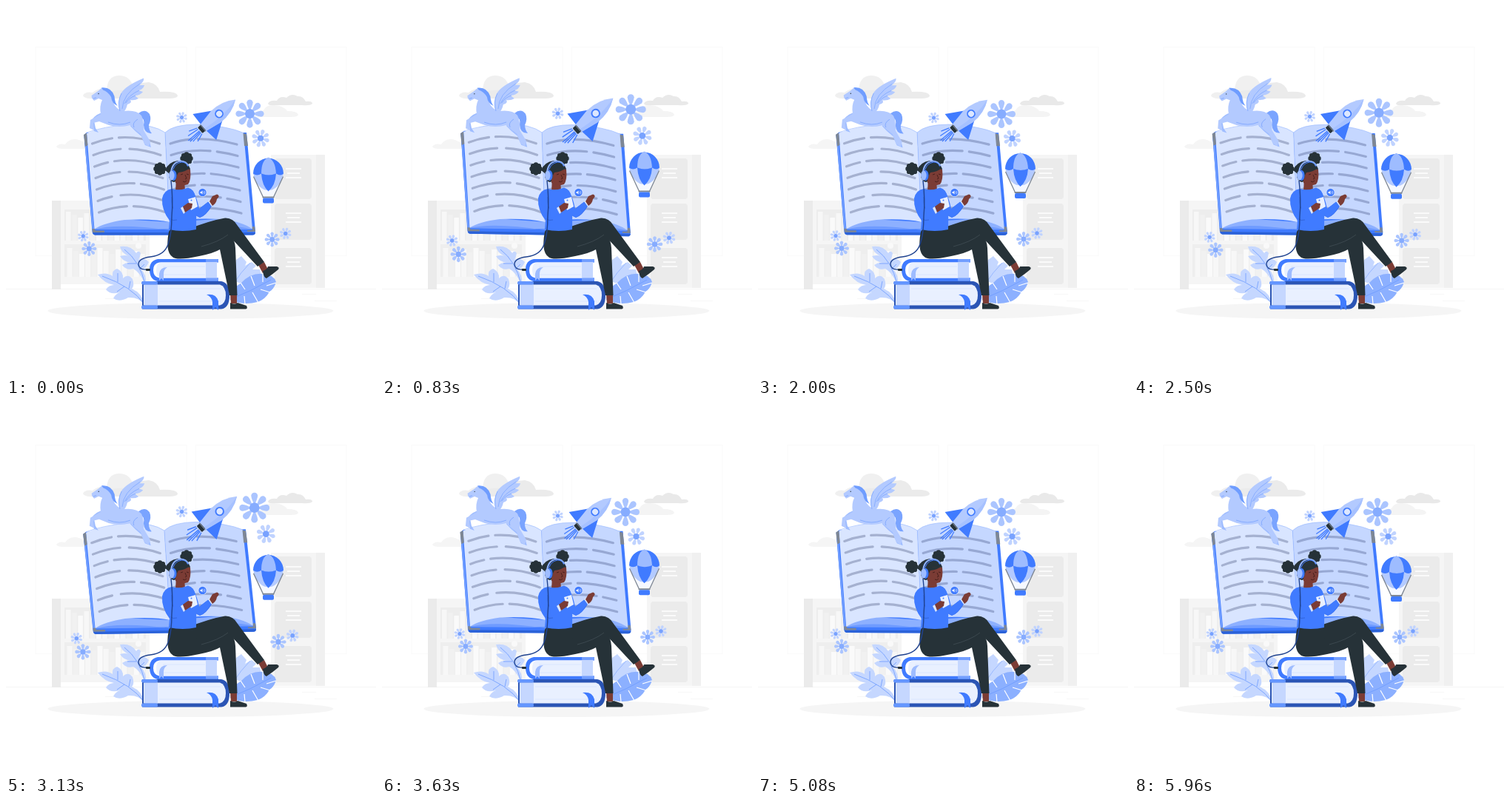
These frames come from a looping animation (500x500 px, 6000 ms). An HTML page with a canvas:

```html
<!DOCTYPE html>
<html lang="en">
<head>
<meta charset="utf-8">
<title>Audio book</title>
<style>
html,body{margin:0;width:100%;height:100%;overflow:hidden;background:#fff}
canvas{display:block;width:100vw;height:100vh}
</style>
</head>
<body>
<canvas id="c"></canvas>
<script>
const cv = document.getElementById('c'), g = cv.getContext('2d');
const LOOP = 6000, TAU = Math.PI * 2;
const BLUE = '#407bff', DARK = '#263238', SKIN = '#7b3c35', DEEP = '#2b55b5';

// drawing helpers
const paths = {};
const path = d => paths[d] || (paths[d] = new Path2D(d));
const fill = (c, d) => { g.fillStyle = c; g.fill(path(d)); };
const line = (c, w, d, dash = []) => {
  g.strokeStyle = c; g.lineWidth = w; g.setLineDash(dash);
  g.stroke(path(d)); g.setLineDash([]);
};
const rect = (c, x, y, w, h, r = 0) => {
  g.fillStyle = c; g.beginPath(); g.roundRect(x, y, w, h, r); g.fill();
};
const oval = (c, x, y, rx, ry = rx, a = 0) => {
  g.fillStyle = c; g.beginPath(); g.ellipse(x, y, rx, ry, a, 0, TAU); g.fill();
};
const pose = (x, y, {turn = 0, scale = 1}, draw) => {
  g.save(); g.translate(x, y); g.rotate(turn * Math.PI / 180);
  g.scale(scale, scale); g.translate(-x, -y); draw(); g.restore();
};

// motion rules: piecewise linear
const ramp = (p, keys) => {
  for (let i = 1; i < keys.length; i++) {
    const [a, u] = keys[i - 1], [b, v] = keys[i];
    if (p <= b) return u + (v - u) * (p - a) / (b - a);
  }
  return keys[keys.length - 1][1];
};
const BEAT = [[0, 0], [.1, 1], [.3, 0], [.4, 0], [.5, 1], [.6, 0], [1, 0]];
const WIND = [[0, 0], [.25, 1], [.75, -1], [1, 0]];
const cycle = t => t < 0 ? 0 : t / 1500 % 1;

function room() {
  g.strokeStyle = '#fafafa'; g.lineWidth = 1;
  g.strokeRect(40, 55.5, 204, 282); g.strokeRect(256.5, 55.5, 203.5, 282);
  line('#f2f2f2', .8, 'M0 382.5H500');
  line('#f5f5f5', .8, 'M417 398.5H447M400 389.5H419M134 395.5H152');
  oval('#f5f5f5', 249.5, 412, 193, 11);

  fill('#f0f0f0', 'M104 121Q107 115 117 117Q127 109 136 114Q137 94 153 94Q168 94 172 110L180 125H119Q106 126 104 121Z');
  fill('#ebebeb', 'M119 122Q128 120 134 118Q146 112 166 114Q177 103 193 103Q205 105 208 116Q230 115 232 121Q232 125 218 125H130Q120 125 119 122Z');
  fill('#f5f5f5', 'M68 190Q71 185 80 187Q85 179 95 180Q104 182 110 188V193H78Q69 193 68 190Z');
  fill('#e9e9e9', 'M354 132Q356 127 366 128Q370 121 379 124Q386 117 394 122Q401 121 405 129Q414 128 414 132Q411 135 400 134H364Q355 135 354 132Z');
  fill('#f4f4f4', 'M335 147Q342 144 348 141Q352 133 362 134Q374 134 380 142Q394 142 395 147Q395 150 384 150H340Z');

  // bookcase
  rect('#ebebeb', 62, 263, 12, 120);
  rect('#f5f5f5', 74, 263, 120, 113);
  rect('#ededed', 79, 275, 110, 42);
  rect('#eeeeee', 79, 322, 110, 44);
  for (let i = 0; i < 13; i++) {
    const x = 81 + i * 8.2, top = i * 7 % 5 * 2;
    const tone = ['#f7f7f7', '#f1f1f1', '#fafafa'][i % 3];
    rect(tone, x, 278 + top, 6.5, 39 - top);
    rect(tone, x + 1.5, 327 + top, 7, 39 - top);
  }
  oval('#f9f9f9', 179, 324, 4);

  // cabinet
  rect('#f5f5f5', 358, 201, 73, 180);
  rect('#f0f0f0', 419, 201, 12, 180);
  for (const y of [206, 267, 327]) {
    rect('#ebebeb', 363, y, 50, y < 210 ? 55 : 49, 4);
    const m = y + (y < 210 ? 20 : 19);
    line('#fafafa', 2.2, `M378 ${m - 6}H399M380 ${m}H397M378 ${m + 6}H399`);
  }
}

const L1 = [28, 38, 19, 34, 52, 20, 39], R1 = [29, 54, 22, 44, 30, 64, 36];
function book() {
  fill(BLUE, 'M105.5 174L109 171L325 171L337 304.5Q337 309.5 333 309.5H120Q117 309 116.5 305Z');
  fill('#2b62d8', 'M117 306H337Q337 309.5 333 309.5H120Q117.500 309 117 306Z');
  fill('#8db0ff', 'M119.500 301.500Q125 292 155 288L222 292L300 287Q326 292 333 301.500Z');
  fill('#6f9bff', 'M119 302Q150 293 222 303Q300 292 333 302Z');
  fill('#d9e5ff', 'M109 172Q132 163 165 160Q200 160 215 171L221 292Q200 287 160 289Q132 293 119.500 301.500Z');
  fill('#c5d7ff', 'M215 171Q226 160 258 160Q300 162 321 171.500L333 301.500Q319 291 290 288Q250 286 221 292Z');
  line('#9fbdff', .7, 'M109 171Q132 163 165 160Q200 160 215 171L221 292M215 171Q226 160 258 160Q300 162 321 171.500');
  line('#6f9dff', 2.5, 'M106.500 174L118 304');
  fill('#7e8794', 'M105 174L109 171.500L110.500 188L107 190ZM320.500 172L325 173L327 189L322 189ZM116.500 301L119.500 301L121 303.500H133V306H117ZM333 298L336 298L337 305H326V303H332.500Z');
  g.lineCap = 'round';
  for (let k = 0; k < 7; k++) {
    const x = 116.5 + k * 1.5, y = 186 + k * 15.5;
    line('#a5b1d0', 3.2, `M${x} ${y}Q${x + 43} ${y - 17} ${x + 91} ${y}`, [L1[k], 9 + k % 2 * 3, 140]);
    const u = 222 + k, v = 186 + k * 15.5;
    line('#97a8d3', 3.2, `M${u} ${v}Q${u + 38} ${v - 13} ${u + 90} ${v + 1}`, [R1[k], 9, 140]);
  }
  g.lineCap = 'butt';
}

function pegasus() {
  fill('#7aa4ff', 'M179 145Q188 138 194 146Q197 153 193 161Q193 168 197 172Q187 173 186 161Q188 150 180 151Z');
  // far legs
  fill('#9fbdff', 'M131 149Q121 150 119 155L121 165L125 171L119 169L116 154Q122 145 132 144Z');
  fill('#9fbdff', 'M172 156Q183 163 184 172L194 183L196 191L188 188L183 176Q174 169 168 162Z');
  // body
  fill('#b3caff', 'M116 124.500L115.500 121L125 114.500L130 110L132 113.500Q141 116 144.500 129Q148 140 159 142Q176 140 183 148Q187 156 186 168L195 183L193 190L187 186L182 173Q174 167 168 161Q153 165 139 161L126 156L118 158L119 168L113 165L114 154L128 146Q126 135 130 127L125 125L119 128Z');
  fill('#6f9dff', 'M129 110.500Q142 109 146.500 122Q147 131 151 135Q143 132 142 123Q138 116 131 113.500Z');
  line('#7aa4ff', .8, 'M138 157Q154 163 168 157M118 125L122 124M178 153Q170 158 173 164');
  oval(DARK, 125, 118.5, .7);
  // wing
  fill('#b3caff', 'M154 143Q149 130 156 117Q163 107 186 97.500Q187 102 180 107L187 107Q185 113 179 114L185 116Q181 121 174 121L179 125Q174 128 168 127Q171 131 164 133Q162 142 157 145Z');
  line('#7fa8ff', .8, 'M154 142Q150 130 156 118M157 139Q158 119 181 105M160 132Q166 120 180 114M162 131Q166 124 175 121');
}

function rocket() {
  g.save(); g.translate(282, 151); g.rotate(-.716);
  line(BLUE, 1.3, 'M-27 0H-47M-27 -3L-43 -5M-27 3L-43 5M-27 -5L-38 -9M-27 5L-38 9M-27 1.500L-46 2.500');
  fill(BLUE, 'M-19 -23L6 -8L-20 -4ZM-18 24L8 8L-20 4Z');
  fill('#b3caff', 'M37 0Q22 -11 2 -10L-20 -6V6L2 10Q22 11 37 0Z');
  fill('#a6c1ff', 'M37 0Q22 11 2 10L-20 6V2Q12 7 37 0Z');
  rect(DARK, -26, -5, 6, 10, 1);
  line('#7e8794', 1, 'M-21 -6V6');
  oval(BLUE, 8, 0, 5.8); oval('#dce7ff', 8, 0, 4);
  g.restore();
}

function balloon() {
  fill('#b3caff', 'M334 226Q336 242 347 251H362Q373 242 375 226Z');
  fill('#f5f8ff', 'M339 240Q347 251 354.500 249Q362 251 370 240L362 258H347Z');
  fill(BLUE, 'M334 227A20.500 21 0 0 1 375 227Q371 231 365 227Q355 231 345 227Q339 231 334 227Z');
  fill('#9ebcff', 'M345 227Q345 209 354.500 205Q364 209 365 227Q355 231 345 227Z');
  fill(BLUE, 'M345 227Q355 231 365 227Q364 243 354.500 251Q346 243 345 227Z');
  line('#7e8794', 1.3, 'M334.500 231L348 260M374.500 231L361 260');
  rect('#7e8794', 346.5, 258, 16, 2, 1);
  rect(BLUE, 347, 260, 15, 7, 2);
}

const FLOWERS = [[329, 146, 19, 1], [343.5, 179, 12, 0], [237.5, 151, 7.5, 0], [105, 310.5, 7.5, 0],
  [113, 327.5, 10, 1], [359, 315, 10, 1], [377, 307, 8, 0]];
const PETAL = 'M.2 0Q.55 -.2 .8 -.22Q1 -.18 1 0Q1 .18 .8 .22Q.55 .2 .2 0Z';
function flower([x, y, r, solid]) {
  for (let i = 0; i < 8; i++) {
    g.save(); g.translate(x, y); g.rotate(i * TAU / 8 + (solid ? 0 : .3)); g.scale(r, r);
    fill(solid ? '#abc5ff' : '#c0d3ff', PETAL);
    g.restore();
  }
  oval(solid ? '#86acff' : '#78a2ff', x, y, r * .34);
}

function leaves() {
  fill('#c5d7ff', 'M187 374Q181 360 172 355Q163 358 157 350Q163 346 169 347Q159 346 154 338Q161 336 166 338Q156 334 154 325Q169 323 176 334Q179 329 182 334Q181 340 179 343Q186 339 193 346Q190 354 183 356Q190 364 189 374Z');
  fill('#c5d7ff', 'M187 403Q179 393 165 394Q153 401 145 395Q148 389 154 387Q141 391 135 383Q139 377 146 377Q133 375 124 363Q136 359 144 365Q143 357 150 355Q159 359 158 368Q165 361 171 369Q174 378 170 382Q184 388 187 403Z');
  line('#6d9bff', .8, 'M188 376Q181 345 160 329M187 403Q170 379 130 365M176 348L164 348M180 356L187 349M160 379L150 386M166 382L168 372M151 373L151 361');
  fill('#c5d7ff', 'M306 371L311 343L318 338L325 346L323 351L332 346L338 351L333 356L343 356L346 369L330 379Z');
  line('#8db0ff', .8, 'M307 376Q317 360 330 347');
  fill('#8cb0ff', 'M303 397Q305 381 318 374Q331 360 348 362Q362 363 365 373Q362 383 356 386Q351 396 340 400Q321 405 306 398Z');
  line('#fff', 1.2, 'M317 374L323 383M331 365L336 378M347 361L347 373M365 374L352 378M357 387L344 383M341 401L333 387M323 403L322 392');
  line('#6d9bff', .8, 'M304 396Q330 386 358 370');
}

function stack() {
  // lower volume
  fill(DEEP, 'M184 372H291Q302 374 302 391Q302 408 291 409.500H184Z');
  fill('#e9f0ff', 'M186 376.500H289Q297 379 297 391Q297 402 289 404.500H186Z');
  line('#d5e2ff', .8, 'M207 382H290M207 399H290');
  rect('#c5d7ff', 187, 376.5, 18, 28);
  rect('#6496ff', 183, 372, 22, 4.5, 2); rect('#6496ff', 183, 404.5, 22, 5, 2);
  fill(BLUE, 'M271 390Q284 388 287 399V411L283 407L279 411V400Q278 393 271 390Z');
  // upper volume
  fill(BLUE, 'M287 342H205Q194 344 194 356Q194 370 205 372H287V367.500H207Q199 366 199 357Q199 348 207 346.500H287Z');
  fill('#e9f0ff', 'M285 346.500H209Q203 348 203 357Q203 366 209 367.500H285Z');
  line('#d5e2ff', .8, 'M212 352H269M212 363H269');
  rect('#c5d7ff', 270, 346.5, 15, 21);
  rect('#739fff', 270, 342, 17, 4, 1); rect('#739fff', 270, 367.5, 17, 4, 1);
  fill('#9ebcff', 'M218 353Q208 353 207 362V371L210 368L213 371V362Q213 356 218 353Z');
}

function reader() {
  // standing leg
  fill(SKIN, 'M303 390H312L312 402H304Z');
  fill(DARK, 'M303 401Q309 404 313 401L325 405Q327 409 324 409.500H303Z');
  fill(DARK, 'M222 302Q250 297 290 306Q309 307 310 327L312.500 391H302L289 329Q281 334 261 338Q238 343 229 341Q214 337 220 305Z');
  // crossed leg
  fill(SKIN, 'M341 350L349 346L354 356L347 361Z');
  fill(DARK, 'M347 358Q353 356 354 352L366 352Q370 353 368 356Q361 362 352 368Q348 367 347 358Z');
  fill(DARK, 'M245 302Q275 290 296 286.500Q307 286 313 297L349 346L340 352L300 309Q287 318 264 324Z');
  line('#45525a', .7, 'M300 309Q287 319 264 325');

  // neck, far arm
  fill(SKIN, 'M230 233H241L242 250H229Z');
  fill('#2f6af0', 'M252 250L261 274L274 264L279 269Q270 284 262 286Q254 284 251 272Z');
  fill(BLUE, 'M252 249Q258 258 261 274L274 264L278 269Q270 283 262 285.500Q256 284 253 274Z');
  fill('#dce7ff', 'M273 264L275 262L280 268L278 271Z');
  fill(SKIN, 'M275 264L279 257L285 254.500Q288 255 287.500 258L285 261Q284 267 279 270Z');
  // torso and near arm
  fill(BLUE, 'M224 247Q235 250 246 245.500Q255 248 256 259Q258 280 257 302Q239 306 220 302L221 290Q210 275 211 260Q213 249 224 247Z');
  line('#3062d6', .9, 'M224 258Q223 270 228 279M221 287Q226 291 231 289');
  fill(BLUE, 'M213 268Q214 285 223 288Q232 287 241 279L237 273L227 274Z');
  fill('#dce7ff', 'M236 273L239 271L243 278L240 281Z');
  fill('#e9f0ff', 'M246 261L256 258L259 271L250 276Z');
  oval(BLUE, 250.5, 262.5, 1);
  fill(SKIN, 'M239 271L246 266L252 267L251 273L242 279Z');

  // head
  oval(DARK, 244, 206, 7.5); oval(DARK, 208, 220, 7);
  for (let i = 0; i < 8; i++) {
    const a = i * TAU / 8, c = 5.5 * Math.cos(a), s = 5.5 * Math.sin(a);
    oval(DARK, 244 + c, 206 + s, 3.2); oval(DARK, 208 + c, 220 + s, 3.2);
  }
  fill(DARK, 'M215 222Q219 211 232 209Q245 208 249 220L243 232L227 238Q219 236 220 226Z');
  fill(SKIN, 'M229 223Q239 218 249 221Q250.500 235 246 241Q239 244 229 239Z');
  fill(DARK, 'M226 231Q226 223 231 220Q240 221 248 219Q243 224 233 225Q230 229 230 234Z');
  line('#3c1a18', .8, 'M236 228L239 227M244 227L247 228M242 228L244 233L242 234M239 237Q242 239 244 236');
  line('#8db0ff', 2.2, 'M223 226Q224 211 236 209.500Q244 210 246 216');
  line(BLUE, 1, 'M225 226Q226 213 237 211Q244 211 246 217');
  oval(BLUE, 226.5, 229, 4, 7); oval('#9ebcff', 223.8, 229, 3.8, 6.5);

  // cable
  line('#20438f', 1.4, 'M223 236Q226 262 224 284Q224 308 219 322Q214 337 195 339Q179 341 179 349Q180 357 190 356');
  rect(DARK, 189, 355, 6, 3, 1);
  // sound badge
  oval('#d9e5ff', 265.5, 252, 6); oval(BLUE, 265.5, 252, 5.2);
  fill('#e9f0ff', 'M262.500 251H263.700L265.500 249.500V254.500L263.700 253H262.500Z');
  line('#e9f0ff', .6, 'M266.700 250.500Q268 252 266.700 253.500M268 249.500Q270 252 268 254.500');
}

function draw(t) {
  const beat = ramp(t / LOOP, BEAT), p = cycle(t);
  g.setTransform(cv.width / 500, 0, 0, cv.height / 500, 0, 0);
  g.fillStyle = '#fff'; g.fillRect(0, 0, 500, 500);
  room();
  pose(221, 237, {turn: ramp(cycle(t - 500), WIND)}, book);
  pose(155, 145, {turn: ramp(p, WIND)}, pegasus);
  pose(279, 154, {scale: 1 + .1 * beat}, rocket);
  g.save(); g.translate(0, -10 * (1 - Math.abs(1 - 2 * p))); balloon(); g.restore();
  pose(237, 226, {scale: 1 + .1 * beat}, () => FLOWERS.forEach(flower));
  leaves();
  stack();
  reader();
}

function fit() {
  const k = window.devicePixelRatio || 1;
  cv.width = Math.round(innerWidth * k); cv.height = Math.round(innerHeight * k);
}
addEventListener('resize', fit);
fit();
const start = performance.now();
function tick(now) {
  draw(Math.max(0, now - start) % LOOP + 30);
  requestAnimationFrame(tick);
}
draw(30);
requestAnimationFrame(tick);
</script>
</body>
</html>
```
